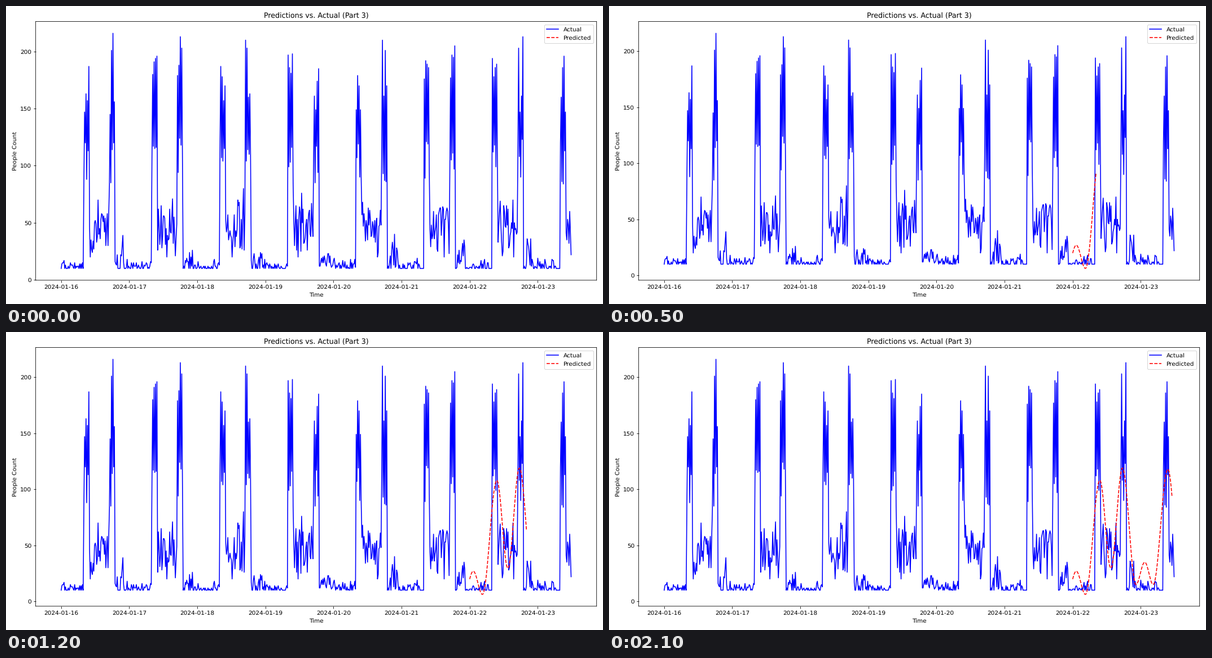
Write a matplotlib script that moves like this. It is 1058 by 529 pixels and loops after 2.2 s.

```python
import numpy as np
import matplotlib.pyplot as plt
from matplotlib.animation import FuncAnimation

SLOTS = 96            # quarter hours per day
COUNT = 720           # samples shown
START = 6 * SLOTS     # first forecast sample
FRAMES, INTERVAL = 22, 100
STEP_MS = 15          # one forecast sample per step
RUSH_LEN = 8          # two hours
MORNING, EVENING = 32, 68

# Highest count of each rush and its place in it, mornings and evenings in turn
PEAKS = [(187, 7), (216, 5), (196, 7), (213, 4), (187, 1), (210, 0),
         (198, 6), (185, 7), (179, 2), (210, 1), (192, 2), (205, 7),
         (194, 0), (213, 7), (196, 5), (190, 4)]

# Peaks and troughs of the forecast: (sample, count)
TURNS = [(-8, 5), (5, 27), (18, 6.2), (38.3, 108), (53.8, 29.5), (70.1, 119),
         (89.2, 15), (101.6, 35), (113.5, 15), (134.2, 118), (149, 46)]


def noise(rng, mean, spread, low, high, n):
    return np.clip(rng.normal(mean, spread, n), low, high)


def make_rush(rng, peak, place):
    """Counts swinging between busy and slack, highest at the given place."""
    busy = rng.uniform(145, peak, RUSH_LEN)
    slack = rng.uniform(82, 125, RUSH_LEN)
    rush = np.where((np.arange(RUSH_LEN) - place) % 2, slack, busy)
    rush[place] = peak
    return rush


def make_day(rng, morning, evening):
    """Quiet night, two rush hours, a busy midday and a calm late evening."""
    day = noise(rng, 11.5, 3.2, 10, 22, SLOTS)
    day[MORNING + RUSH_LEN:EVENING] = noise(
        rng, 45, 15, 20, 80, EVENING - MORNING - RUSH_LEN)
    day[79:92] = noise(rng, 19, 9, 10, 40, 13)
    for first, (peak, place) in ((MORNING, morning), (EVENING, evening)):
        day[first:first + RUSH_LEN] = make_rush(rng, peak, place)
    return np.round(day)


def forecast(n):
    """Cosine easing from one turning point to the next."""
    xs, ys = np.array(TURNS).T
    k = np.searchsorted(xs, n, side="right") - 1
    t = (n - xs[k]) / (xs[k + 1] - xs[k])
    return ys[k] + (ys[k + 1] - ys[k]) * (1 - np.cos(np.pi * t)) / 2


rng = np.random.default_rng(16)
actual = np.concatenate([make_day(rng, am, pm)
                         for am, pm in zip(PEAKS[::2], PEAKS[1::2])])[:COUNT]
days = np.arange(COUNT) / SLOTS
predicted = forecast(np.arange(COUNT - START))

plt.rcParams["text.hinting"] = "none"
fig, ax = plt.subplots(figsize=(14, 7), dpi=75.5715)   # 1058 x 529 pixels
ax.plot(days, actual, color="blue", label="Actual")
pred_line, = ax.plot([], [], color="red", linestyle="--", label="Predicted")
ax.set_title("Predictions vs. Actual (Part 3)")
ax.set_xlabel("Time")
ax.set_ylabel("People Count")
ax.set_xticks(range(8), [f"2024-01-{16 + d}" for d in range(8)])
ax.legend(loc="upper right")
for spine in ax.spines.values():
    spine.set_snap(False)
fig.tight_layout()


def update(frame):
    n = round(frame * INTERVAL / STEP_MS) + 1
    pred_line.set_data(days[START:START + n], predicted[:n])
    ax.relim()
    ax.autoscale_view()
    return pred_line,


anim = FuncAnimation(fig, update, frames=FRAMES, interval=INTERVAL,
                     repeat=True, repeat_delay=0)
plt.show()
```
